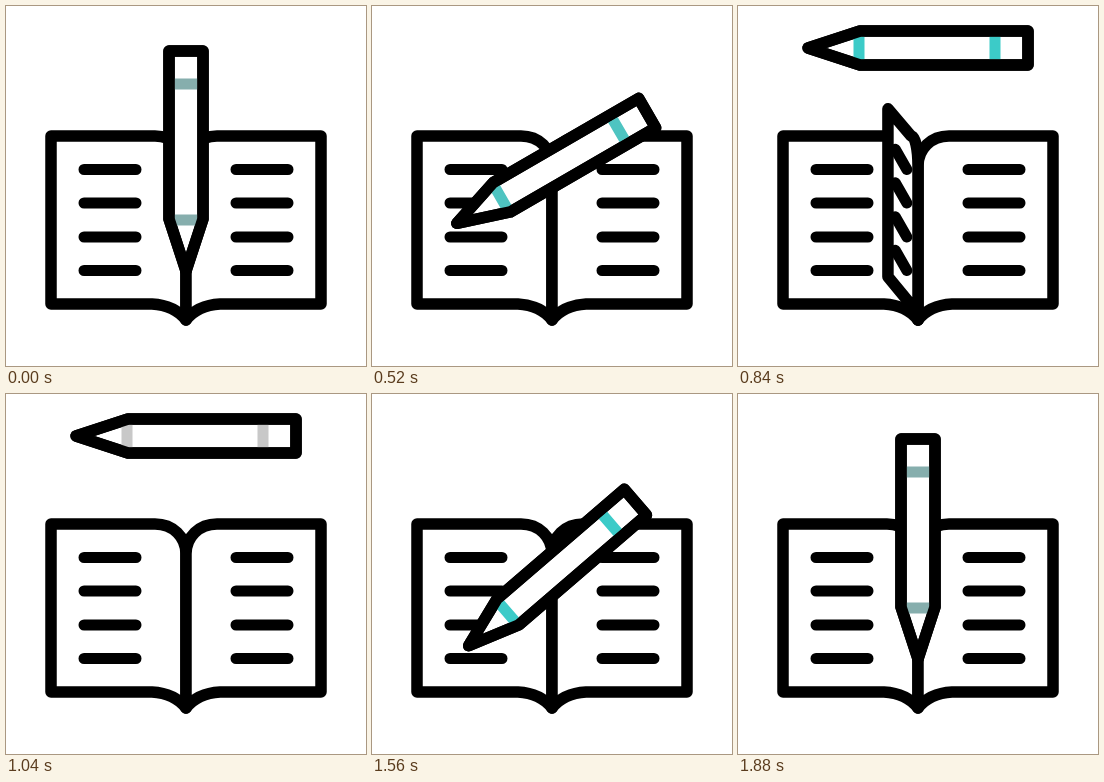
These frames come from a looping animation (360x360 px, 2 s). An HTML page:

```html
<!DOCTYPE html>
<html lang="en">
<head>
<meta charset="utf-8">
<title>Pencil and notebook</title>
<style>
  html, body { margin: 0; width: 100%; height: 100%; overflow: hidden; background: #fff; }
  svg { display: block; width: 100%; height: 100%; }
  .ink { fill: #fff; stroke: #000; stroke-width: 11.5; stroke-linecap: round; stroke-linejoin: round; }
  .text { fill: none; stroke-width: 11; }
</style>
</head>
<body>
<svg viewBox="0 0 360 360">
  <g id="book"></g>
  <g id="leaf">
    <path class="ink" id="sheet"/>
    <path class="ink text" id="rows"/>
  </g>
  <g id="pencil">
    <path class="ink" d="M0 110L-17 58V-110H17V58Z"/>
    <path id="bands" d="M-11.5 -77H11.5M-11.5 59H11.5" fill="none" stroke-width="11"/>
    <path class="ink" style="fill:none" d="M0 110L-17 58V-110H17V58Z"/>
  </g>
</svg>
<script>
const LOOP = 2000;
const SPINE = 180;
const ROWS = [163.5, 197, 231, 264.5];
const $ = id => document.getElementById(id);

const clamp = v => Math.min(1, Math.max(0, v));
const ramp = (t, from, to) => clamp((t - from) / (to - from));
const ease = (t, from, to) => {
  const u = ramp(t, from, to);
  return u * u * (3 - 2 * u);
};
const mix = (a, b, u) => a + (b - a) * u;
const mixColor = (a, b, u) => `rgb(${a.map((v, i) => Math.round(mix(v, b[i], u)))})`;

// k is the signed page width (1 right, -1 left), rise lifts the outer edge
function sheetPath(k, rise) {
  const x = d => (SPINE + k * d).toFixed(2);
  const top = 130 - rise, bottom = 298 - rise;
  return `M180 314V160C${x(0)} 143 ${x(13)} 130 ${x(31)} 130L${x(135)} ${top}V${bottom}` +
    `L${x(34)} 298C${x(17)} 299 ${x(7)} 305 180 314Z`;
}

function rowsPath(k, rise) {
  const a = SPINE + k * 50, b = SPINE + k * 102;
  return ROWS.map(y => `M${a} ${y}L${b} ${y - rise * 0.74}`).join('');
}

$('book').innerHTML = [-1, 1].map(k =>
  `<path class="ink" d="${sheetPath(k, 0)}"/><path class="ink text" d="${rowsPath(k, 0)}"/>`
).join('');

const DULL = [134, 174, 173], TEAL = [60, 203, 200], GREY = [200, 200, 200];

function bandColor(t) {
  if (t >= 1040 && t < 1320) return mixColor(GREY, GREY, 0);
  const u = t < 1040 ? ramp(t, 40, 680) : 1 - ramp(t, 1560, 1880);
  return mixColor(DULL, TEAL, u);
}

function pencilPose(t) {
  if (t < 1280) {
    return {
      angle: 90 * ease(t, 80, 800),
      y: 155 + 25 * ease(t, 80, 440) - 138 * ease(t, 440, 800)
    };
  }
  return {
    angle: 90 - 90 * ease(t, 1280, 1880),
    y: 42 + 138 * ease(t, 1280, 1560) - 25 * ease(t, 1560, 1880)
  };
}

function draw(t) {
  const turn = ease(t, 572, 1040);
  const k = 1 - 2 * turn;
  const rise = 29 * Math.sin(Math.PI * turn);
  $('leaf').style.display = turn > 0 && turn < 1 ? '' : 'none';
  $('sheet').setAttribute('d', sheetPath(k, rise));
  $('rows').setAttribute('d', rowsPath(k, rise));

  const { angle, y } = pencilPose(t);
  $('pencil').setAttribute('transform', `translate(180 ${y}) rotate(${angle})`);
  $('bands').setAttribute('stroke', bandColor(t));
}

const start = performance.now();
function tick() {
  draw((performance.now() - start) % LOOP);
  requestAnimationFrame(tick);
}
tick();
</script>
</body>
</html>
```
